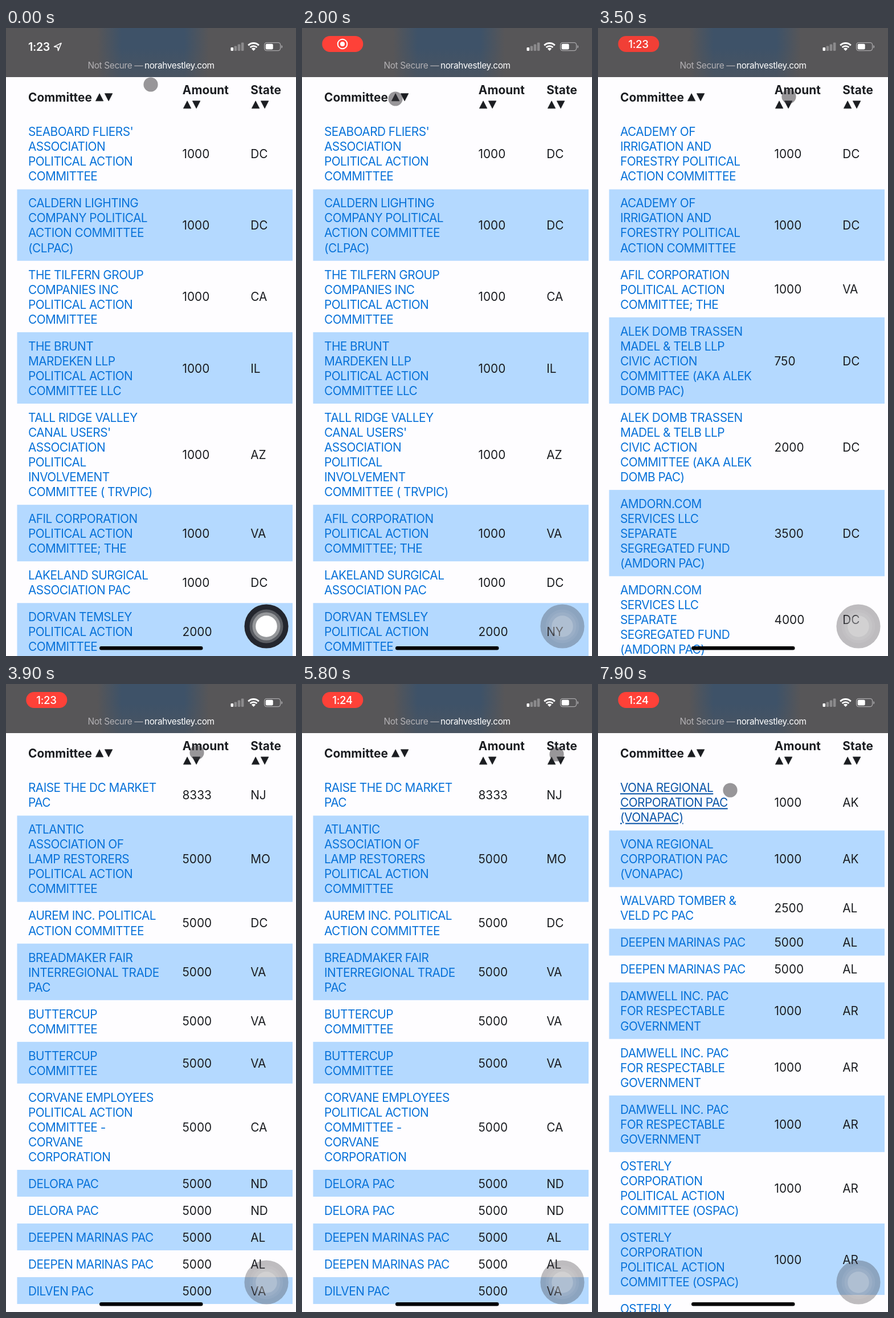
An HTML page that plays this animation: 509x1100 px, repeating every 8 s.

```html
<!DOCTYPE html>
<html lang="en">
<head>
<meta charset="utf-8">
<title>Committee table sorting</title>
<style>
  html, body { margin: 0; width: 100%; height: 100%; overflow: hidden; background: #fefdff; }
  svg { display: block; width: 100vw; height: 100vh; }
  text { font-family: Inter, "Liberation Sans", sans-serif; font-size: 20.8px; white-space: pre; }
  .link { fill: #0872d9; letter-spacing: -.53px; }
  .cell { fill: #1b1d21; letter-spacing: 0; }
  .head { fill: #1b1d21; font-weight: 700; letter-spacing: .08px; }
  .hover .link { fill: #0a55a8; text-decoration: underline; text-decoration-thickness: 1.5px; text-underline-offset: 2px; }
  .url { font-size: 15.4px; letter-spacing: -.36px; }
  .clock { font-weight: 600; fill: #fff; letter-spacing: -.3px; }
</style>
</head>
<body>
<svg viewBox="0 0 509 1100" preserveAspectRatio="none">
  <defs>
    <linearGradient id="tint">
      <stop offset="0" stop-color="#3e5268" stop-opacity="0"/>
      <stop offset=".22" stop-color="#3e5268"/>
      <stop offset=".78" stop-color="#3e5268"/>
      <stop offset="1" stop-color="#3e5268" stop-opacity="0"/>
    </linearGradient>
    <linearGradient id="dim" x2="0" y2="1">
      <stop offset=".4" stop-color="#575658" stop-opacity="0"/>
      <stop offset="1" stop-color="#575658" stop-opacity=".45"/>
    </linearGradient>
  </defs>
  <rect width="509" height="1100" fill="#fefdff"/>
  <g id="tables"></g>
  <g id="heads"></g>

  <rect width="509" height="86" fill="#575658"/>
  <rect x="160" width="196" height="86" fill="url(#tint)"/>
  <rect width="509" height="86" fill="url(#dim)"/>
  <text class="url" x="143.5" y="71" fill="#b3b1b4">Not Secure —</text>
  <text class="url" x="243" y="71" fill="#fff">norahvestley.com</text>

  <g id="plain">
    <text class="clock" x="39" y="39.5" style="font-size:19.6px">1:23</text>
    <path d="M97 26.5 84.5 32.6 90.7 33.6 91.6 39.6Z" fill="none" stroke="#fff" stroke-width="1.6" stroke-linejoin="round"/>
  </g>
  <g id="pill">
    <rect id="pillBg" x="35.3" y="14" width="72" height="28" rx="14"/>
    <g id="rec">
      <circle cx="71" cy="28" r="8.3" fill="none" stroke="#fff" stroke-width="2"/>
      <circle cx="71" cy="28" r="4" fill="#fff"/>
    </g>
    <text id="time" class="clock" x="71" y="34.6" text-anchor="middle" style="font-size:18.6px;font-weight:500"></text>
  </g>

  <g fill="#fff">
    <rect x="394.5" y="34" width="4.6" height="6" rx="1.2"/>
    <g fill="#8b8a8c">
      <rect x="400.6" y="31.5" width="4.6" height="8.5" rx="1.2"/>
      <rect x="406.7" y="28.5" width="4.6" height="11.5" rx="1.2"/>
      <rect x="412.8" y="25.5" width="4.6" height="14.5" rx="1.2"/>
    </g>
    <path d="M434.5 40 430.9 36.3A5.2 5.2 0 0 1 438.1 36.3Z"/>
    <g fill="none" stroke="#fff" stroke-width="2.9">
      <path d="M428.6 34A8.4 8.4 0 0 1 440.4 34"/>
      <path d="M425.2 30.4A13.2 13.2 0 0 1 443.8 30.4"/>
    </g>
    <rect x="453.6" y="25.6" width="28" height="14" rx="4" fill="none" stroke="#a9a8aa" stroke-width="1.3"/>
    <rect x="455.7" y="27.7" width="13" height="9.8" rx="2"/>
    <path d="M483.3 30v5.4q2-.7 2-2.7t-2-2.7Z" fill="#a9a8aa"/>
  </g>

  <g id="button">
    <circle cx="457" cy="1048" r="38.6"/>
    <circle cx="457" cy="1048" r="29.5" fill="#fff"/>
    <circle cx="457" cy="1048" r="24.5" fill="#fff"/>
    <circle cx="457" cy="1048" r="18.8" fill="#fff"/>
  </g>
  <rect x="164" y="1083" width="181.5" height="6.4" rx="3.2" fill="#050506"/>
  <circle id="cursor" r="12.6" fill="#3a383b" fill-opacity=".52"/>
</svg>
<script>
const LOOP = 8000, LINE = 26.04, TOP = 157.5;
const $ = id => document.getElementById(id);

function add(parent, tag, attrs, text) {
  const el = document.createElementNS('http://www.w3.org/2000/svg', tag);
  for (const k in attrs) el.setAttribute(k, attrs[k]);
  if (text) el.textContent = text;
  parent.appendChild(el);
  return el;
}

// Each row: name lines split by "/", then amount and state.
const PAC = 'POLITICAL ACTION/COMMITTEE';
const afil = 'AFIL CORPORATION/POLITICAL ACTION/COMMITTEE; THE;1000;VA';
const academy = 'ACADEMY OF/IRRIGATION AND/FORESTRY POLITICAL/ACTION COMMITTEE;1000;DC';
const alek = 'ALEK DOMB TRASSEN/MADEL & TELB LLP/CIVIC ACTION/COMMITTEE (AKA ALEK/DOMB PAC);';
const amdorn = 'AMDORN.COM/SERVICES LLC/SEPARATE/SEGREGATED FUND/(AMDORN PAC);';
const buttercup = 'BUTTERCUP/COMMITTEE;5000;VA';
const delora = 'DELORA PAC;5000;ND';
const deepen = 'DEEPEN MARINAS PAC;5000;AL';
const vona = 'VONA REGIONAL/CORPORATION PAC/(VONAPAC);1000;AK';
const damwell = 'DAMWELL INC. PAC/FOR RESPECTABLE/GOVERNMENT;1000;AR';
const osterly = `OSTERLY/CORPORATION/${PAC} (OSPAC);1000;AR`;

const lists = [
  [`SEABOARD FLIERS'/ASSOCIATION/${PAC};1000;DC`,
   'CALDERN LIGHTING/COMPANY POLITICAL/ACTION COMMITTEE/(CLPAC);1000;DC',
   `THE TILFERN GROUP/COMPANIES INC/${PAC};1000;CA`,
   `THE BRUNT/MARDEKEN LLP/${PAC} LLC;1000;IL`,
   "TALL RIDGE VALLEY/CANAL USERS'/ASSOCIATION/POLITICAL/INVOLVEMENT/COMMITTEE ( TRVPIC);1000;AZ",
   afil,
   'LAKELAND SURGICAL/ASSOCIATION PAC;1000;DC',
   `DORVAN TEMSLEY/${PAC};2000;NY`],
  [academy, academy, afil, alek + '750;DC', alek + '2000;DC', amdorn + '3500;DC', amdorn + '4000;DC'],
  ['RAISE THE DC MARKET/PAC;8333;NJ',
   `ATLANTIC/ASSOCIATION OF/LAMP RESTORERS/${PAC};5000;MO`,
   'AUREM INC. POLITICAL/ACTION COMMITTEE;5000;DC',
   'BREADMAKER FAIR/INTERREGIONAL TRADE/PAC;5000;VA',
   buttercup, buttercup,
   `CORVANE EMPLOYEES/${PAC} -/CORVANE/CORPORATION;5000;CA`,
   delora, delora, deepen, deepen, 'DILVEN PAC;5000;VA'],
  [vona, vona, 'WALVARD TOMBER &/VELD PC PAC;2500;AL', deepen, deepen,
   damwell, damwell, damwell, osterly, osterly, osterly]
];

const tables = lists.map(rows => {
  const table = add($('tables'), 'g', {});
  let y = TOP;
  rows.forEach((row, i) => {
    const [, name, amount, state] = row.match(/^(.*);(\d+);(\w+)$/);
    const lines = name.split('/'), h = lines.length * LINE + 20.95;
    const g = add(table, 'g', {});
    if (i % 2) add(g, 'rect', { x: 19.5, y, width: 483.5, height: h, fill: '#b4d9ff' });
    lines.forEach((s, n) => add(g, 'text', { class: 'link', x: 39, y: y + 31.8 + n * LINE }, s));
    add(g, 'text', { class: 'cell', x: 309.5, y: y + h / 2 + 8.2 }, amount);
    add(g, 'text', { class: 'cell', x: 429.2, y: y + h / 2 + 8.2 }, state);
    y += h;
  });
  return table;
});

function heading(label, x, y, ax, ay) {
  add($('heads'), 'text', { class: 'head', x, y }, label);
  add($('heads'), 'path', {
    d: `M${ax} ${ay + 13.5}h13.4l-6.7-13ZM${ax + 16} ${ay + .5}h13.4l-6.7 13Z`,
    fill: '#1b1d21', stroke: '#1b1d21', 'stroke-width': .8, 'stroke-linejoin': 'round'
  });
}
heading('Committee', 39, 129, 157.4, 114.3);
heading('Amount', 309.8, 116, 311.4, 127.3);
heading('State', 429.3, 116, 431.4, 127.3);

const path = [[0, 254, 99], [1200, 268, 106], [1950, 164, 124], [2750, 164, 124],
  [3500, 335, 120], [4600, 335, 120], [5400, 447, 123], [7250, 447, 123], [7800, 232, 186], [LOOP, 232, 186]];
const clamp = v => Math.max(0, Math.min(1, v));
const ease = v => v * v * (3 - 2 * v);
const ramp = (t, a, b) => ease(clamp((t - a) / (b - a)));
const mix = (a, b, k) => a + (b - a) * k;

function cursorAt(t) {
  const i = path.findIndex(p => p[0] > t);
  const a = path[i - 1], b = path[i], k = ramp(t, a[0], b[0]);
  return [mix(a[1], b[1], k), mix(a[2], b[2], k)];
}

const discs = [...$('button').children];
const awake = [1, .25, .36, 1], idle = [.33, .06, .07, .2];

function draw(t) {
  const shown = t < 2150 ? 0 : t < 3800 ? 1 : t < 6050 ? 2 : 3;
  tables.forEach((g, i) => g.setAttribute('display', i === shown ? 'inline' : 'none'));
  tables[3].firstChild.setAttribute('class', t >= 7700 ? 'hover' : '');

  const [x, y] = cursorAt(t);
  $('cursor').setAttribute('cx', x);
  $('cursor').setAttribute('cy', y);

  const on = ramp(t, 250, 500);
  $('plain').setAttribute('opacity', 1 - on);
  $('pill').setAttribute('opacity', on);
  const glow = Math.sqrt(.5 - .5 * Math.cos((t - 1200) / 1900 * 2 * Math.PI));
  $('pillBg').setAttribute('fill',
    `rgb(${mix(219, 255, glow)},${mix(59, 65, glow)},${mix(52, 56, glow)})`);
  const swap = ramp(t, 2950, 3200);
  $('rec').setAttribute('opacity', 1 - swap);
  $('time').setAttribute('opacity', swap);
  $('time').textContent = t < 4800 ? '1:23' : '1:24';

  const rest = ramp(t, 1500, 1900);
  discs.forEach((d, i) => d.setAttribute('fill-opacity', mix(awake[i], idle[i], rest)));
  discs[0].setAttribute('fill', `rgb(${mix(35, 58, rest)},${mix(38, 56, rest)},${mix(46, 62, rest)})`);
}

const start = performance.now();
function tick() {
  draw((performance.now() - start) % LOOP);
  requestAnimationFrame(tick);
}
tick();
</script>
</body>
</html>
```
